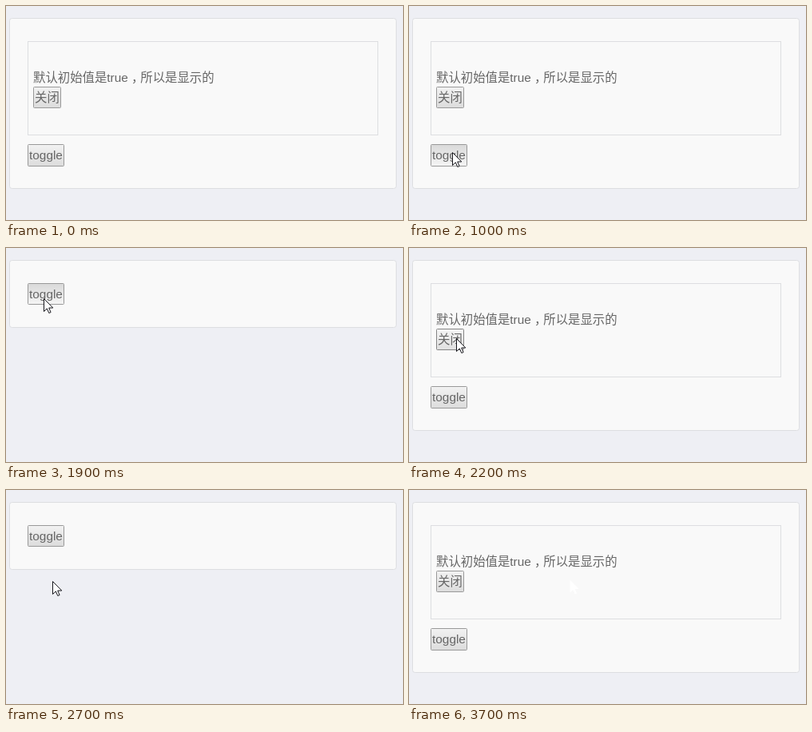
Write an HTML page that moves like this. It is 497x268 px and loops after 4300 ms.

```html
<!DOCTYPE html>
<html lang="zh-CN">
<head>
<meta charset="utf-8">
<title>toggle</title>
<style>
html, body { margin: 0; width: 100%; height: 100%; overflow: hidden; background: #eeeff4; }
svg { display: block; }
text { font: 350 15.4px "Liberation Sans", Arial, "Noto Sans CJK SC", "Noto Sans CJK", sans-serif; fill: #666; }
.frame { stroke: #dddee1; }
.button rect { fill: url(#normal); stroke: #999; }
.button.hover rect { fill: url(#hover); stroke: #858585; }
.button.pressed rect { fill: url(#pressed); }
</style>
</head>
<body>
<svg width="497" height="268" viewBox="0 0 497 268">
  <defs>
    <linearGradient id="normal" x2="0" y2="1"><stop stop-color="#f2f2f2"/><stop offset="1" stop-color="#dcdcdc"/></linearGradient>
    <linearGradient id="hover" x2="0" y2="1"><stop stop-color="#f5f5f5"/><stop offset="1" stop-color="#e0e0e0"/></linearGradient>
    <linearGradient id="pressed" x2="0" y2="1"><stop stop-color="#d9d9d9"/><stop offset="1" stop-color="#f5f5f5"/></linearGradient>
  </defs>
  <rect id="panel" class="frame" x="4.5" y="15.5" width="484" height="213" rx="3" fill="#f9f9f9"/>
  <g id="content">
    <rect class="frame" x="27.5" y="44.5" width="438" height="117" fill="none"/>
    <text x="34" y="95">默认初始值是true<tspan dx="4">，</tspan><tspan dx="-4">所以是显示的</tspan></text>
    <g id="close" class="button">
      <rect x="34.5" y="101.5" width="34" height="26" rx="1"/>
      <text x="36" y="120">关闭</text>
    </g>
  </g>
  <g id="toggle" class="button">
    <rect x="27.5" y="173.5" width="45" height="27" rx="1"/>
    <text x="29" y="192">toggle</text>
  </g>
  <path id="cursor" d="M.5 .5V16.5L4.3 12.9L6.8 18.5L9.1 17.5L6.7 12H11.8Z" fill="#fff" stroke="#16161c"/>
</svg>
<script>
const LOOP = 4300, TICK = 100, FOLD = 129;
const ENTER = 100, REST = 3700;
const [panel, content, closeButton, toggle, cursor] =
  ['panel', 'content', 'close', 'toggle', 'cursor'].map(id => document.getElementById(id));
const toggleBox = toggle.querySelector('rect');

const entry = { x: 234, y: 126 };
const moves = [
  { end: 600, duration: 500, x: 68, y: 200 },
  { end: 800, duration: 200, x: 54, y: 183 },
  { end: 1600, duration: 400, x: 47, y: 63 },
  { end: 2200, duration: 100, x: 59, y: 113 },
  { end: 2400, duration: 100, x: 58, y: 114 },
  { end: 3000, duration: 200, x: 49, y: 55 },
  { end: REST, duration: 200, x: 201, y: 112 }
];
const clicks = [
  { button: toggle, down: 1000, up: 1100 },
  { button: toggle, down: 1900, up: 2000 },
  { button: closeButton, down: 2600, up: 2700 },
  { button: toggle, down: 3300, up: 3500 }
];

const within = (v, from, to) => v >= from && v < to;
const easeOut = k => 1 - (1 - k) ** 3;
const mix = (a, b, k) => a + (b - a) * k;

function pointerAt(t) {
  return moves.reduce((p, { end, duration, x, y }) => {
    const k = easeOut(Math.min(1, Math.max(0, 1 - (end - t) / duration)));
    return { x: mix(p.x, x, k), y: mix(p.y, y, k) };
  }, entry);
}

function setButton(button, t, hover) {
  const pressed = clicks.some(c => c.button === button && within(t, c.down, c.up));
  button.setAttribute('class', 'button' + (pressed ? ' pressed' : hover ? ' hover' : ''));
}

function draw(time) {
  const t = Math.floor((time % LOOP) / TICK) * TICK;
  // Every finished click flips the panel.
  const open = clicks.filter(c => c.up <= t).length % 2 === 0;
  const shown = t >= ENTER;
  const { x, y } = pointerAt(t);
  const over = (left, top, w, h) => shown && within(x, left, left + w) && within(y, top, top + h);

  panel.setAttribute('height', open ? 213 : 213 - FOLD);
  content.setAttribute('visibility', open ? 'visible' : 'hidden');
  toggle.setAttribute('transform', `translate(0 ${open ? 0 : -FOLD})`);
  toggleBox.setAttribute('height', open ? 27 : 26);

  setButton(toggle, t, over(27, open ? 173 : 44, 46, 28));
  setButton(closeButton, t, open && over(34, 101, 35, 27));

  cursor.setAttribute('visibility', shown ? 'visible' : 'hidden');
  cursor.setAttribute('transform', `translate(${Math.round(x)} ${Math.round(y)})`);
  cursor.setAttribute('stroke', t < REST ? '#16161c' : 'none');
}

const start = performance.now();
function tick() {
  draw(performance.now() - start);
  requestAnimationFrame(tick);
}
tick();
</script>
</body>
</html>
```
